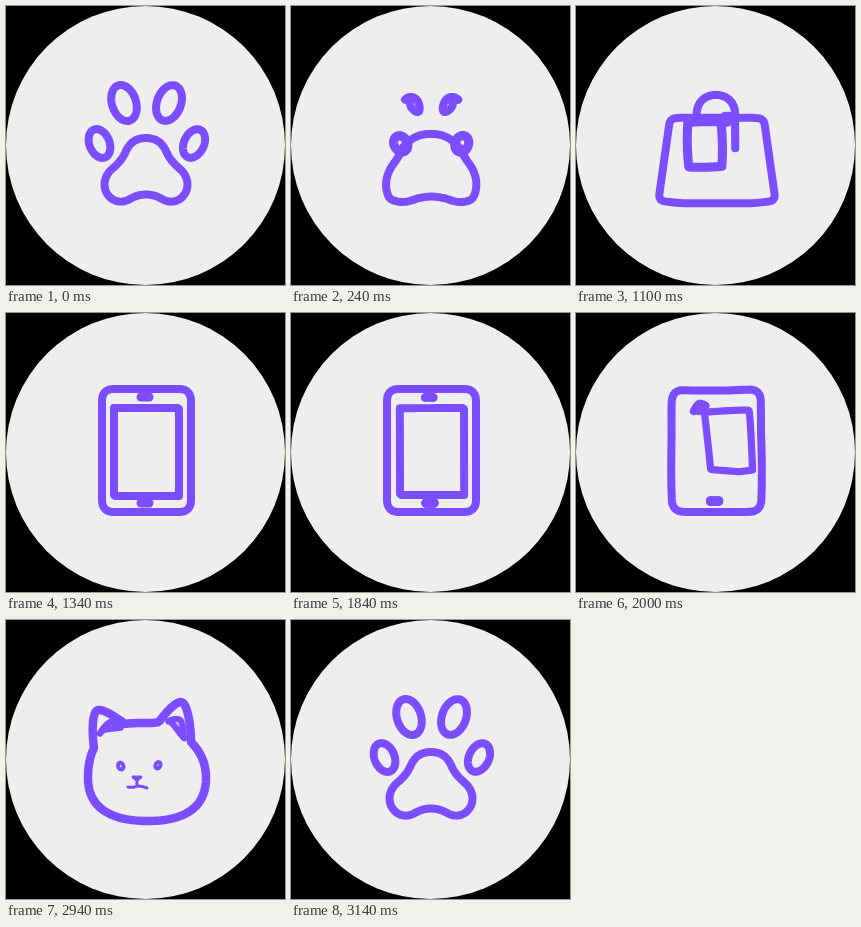
Write an HTML page with a canvas that moves like this. It is 279x279 px and loops after 3.18 s.

```html
<!DOCTYPE html>
<html lang="en">
<head>
<meta charset="utf-8">
<title>Morphing pet icons</title>
<style>
html, body { margin: 0; width: 100%; height: 100%; overflow: hidden; background: #000; }
canvas { display: block; width: 279px; height: 279px; }
</style>
</head>
<body>
<canvas id="stage"></canvas>
<script>
const SIZE = 279, LOOP = 3180, TICK = 40, SAMPLES = 144;
const INK = '#7c4dff', PAPER = '#eeeeee';

const canvas = document.getElementById('stage');
const ctx = canvas.getContext('2d');
const ratio = window.devicePixelRatio || 1;
canvas.width = canvas.height = Math.round(SIZE * ratio);

// Evenly spaced points along an SVG path.
function trace(d, width) {
  const path = document.createElementNS('http://www.w3.org/2000/svg', 'path');
  path.setAttribute('d', d);
  const length = path.getTotalLength();
  const points = [];
  for (let i = 0; i <= SAMPLES; i++) {
    const p = path.getPointAtLength(length * i / SAMPLES);
    points.push([p.x, p.y]);
  }
  return { points, width };
}

function oval(cx, cy, rx, ry, tilt, width, start = -90) {
  const a = tilt * Math.PI / 180;
  const points = [];
  for (let i = 0; i <= SAMPLES; i++) {
    const t = start * Math.PI / 180 + i / SAMPLES * Math.PI * 2;
    const x = rx * Math.cos(t), y = ry * Math.sin(t);
    points.push([cx + x * Math.cos(a) - y * Math.sin(a),
                 cy + x * Math.sin(a) + y * Math.cos(a)]);
  }
  return { points, width };
}

// Paw
const pad = trace('M140 132C149 132 156 136 160 145C163 152 167 157 174 163C182 170 184 181 178 189C172 197 163 197 156 193C146 187 134 187 124 193C117 197 108 197 102 189C96 181 98 170 106 163C113 157 117 152 120 145C124 136 131 132 140 132', 8);
const toeL = oval(118, 97, 12, 18.5, -18, 8);
const toeR = oval(163, 97, 12, 18.5, 20, 8);
const sideL = oval(93.5, 137.5, 10, 15, -22, 8);
const sideR = oval(188, 137.5, 10, 15, 25, 8);

// Bag
const body = trace('M140 115.5H182Q188 115.5 189 121L200 190Q201 197 194 197H88Q81 197 82 190L93 121Q94 115.5 100 115.5H140', 8);
const handle = trace('M119 137V99C119 86 128 78 140 78S161 86 161 99V137', 8);
const knobL = oval(119, 138, 5, 5, 0, 10, -140);
const knobR = oval(161, 138, 5, 5, 0, 10);

// Tablet
const frame = trace('M140 76H173Q185 76 185 88V187Q185 199 173 199H108Q96 199 96 187V88Q96 76 108 76H140', 8);
const screen = trace('M108 95H173V183H108V95', 8);
const lens = trace('M135 84H143', 9);
const home = trace('M135 190H143', 9);

// Cat
const head = trace('M140 103C145 103 149 103 153 102C160 92 170 81 176 82C181 84 185 104 185 122C195 132 200 144 200 158C200 188 178 201 142 201C105 201 82 188 82 158C82 146 84 136 88 128C86 112 86 97 90 91C93 87 106 94 119 104C126 103 133 103 140 103', 8.5);
const earL = trace('M90 121C93 111 97 102 101 101C104 101 109 103 114 106C104 109 96 114 90 121', 6);
const earR = trace('M161 106C166 102 172 99 175 101C178 104 181 112 184 120C178 114 170 109 161 106', 6);
const eyeL = oval(119.5, 148, 1, 1, 0, 3);
const eyeR = oval(144, 147, .8, .8, 0, 3);
const nose = trace('M127 157H135L131 160L127 157', 3);
const mouth = trace('M122 167Q127 168 131 166V160V166Q136 166 141 168', 3);

// Pairs are [from, to, late, filled].
const morphs = [
  { start: 0, end: 440, pairs: [
    [pad, body, true], [toeL, handle, true], [toeR, handle, true],
    [sideR, knobR], [sideL, knobL]] },
  { start: 900, end: 1340, pairs: [
    [body, frame, true], [handle, home, true], [knobR, lens],
    [knobL, screen, false, true]] },
  { start: 1800, end: 2280, pairs: [
    [frame, head, true], [screen, earR], [lens, earL],
    [home, nose, true], [home, mouth, true], [home, eyeL, true], [home, eyeR, true]] },
  { start: 2860, end: 3140, pairs: [
    [head, pad, true], [nose, pad, true], [mouth, pad, true],
    [earL, toeL], [earR, toeR], [eyeL, sideL], [eyeR, sideR]] }
];

const mix = (a, b, p) => a + (b - a) * p;
const clamp = v => Math.max(0, Math.min(1, v));
const ease = v => v < .5 ? 2 * v * v : 1 - 2 * (1 - v) * (1 - v);

function blend(from, to, p) {
  return {
    width: mix(from.width, to.width, p),
    points: from.points.map(([x, y], i) =>
      [mix(x, to.points[i][0], p), mix(y, to.points[i][1], p)])
  };
}

function stroke({ points, width }, filled) {
  ctx.beginPath();
  points.forEach(([x, y]) => ctx.lineTo(x, y));
  if (filled) ctx.fill();
  ctx.lineWidth = width;
  ctx.stroke();
}

function draw(time) {
  const t = time % LOOP;
  const morph = morphs.filter(m => m.start <= t).pop();
  const elapsed = Math.floor((t - morph.start) / TICK) * TICK;
  const p = clamp(elapsed / (morph.end - morph.start));

  ctx.setTransform(canvas.width / SIZE, 0, 0, canvas.height / SIZE, 0, 0);
  ctx.clearRect(0, 0, SIZE, SIZE);
  ctx.fillStyle = PAPER;
  ctx.strokeStyle = INK;
  ctx.lineCap = ctx.lineJoin = 'round';
  ctx.beginPath();
  ctx.arc(SIZE / 2, SIZE / 2, SIZE / 2, 0, Math.PI * 2);
  ctx.fill();

  // At rest, shapes shared by several pairs are drawn once.
  if (p === 0 || p === 1) {
    new Set(morph.pairs.map(pair => pair[p])).forEach(shape => stroke(shape));
    return;
  }
  morph.pairs.forEach(([from, to, late, filled]) => {
    const local = late ? (p - .3) / .7 : p / .95;
    stroke(blend(from, to, ease(clamp(local))), filled);
  });
}

const origin = performance.now();
function tick() {
  draw(performance.now() - origin);
  requestAnimationFrame(tick);
}
tick();
</script>
</body>
</html>
```
